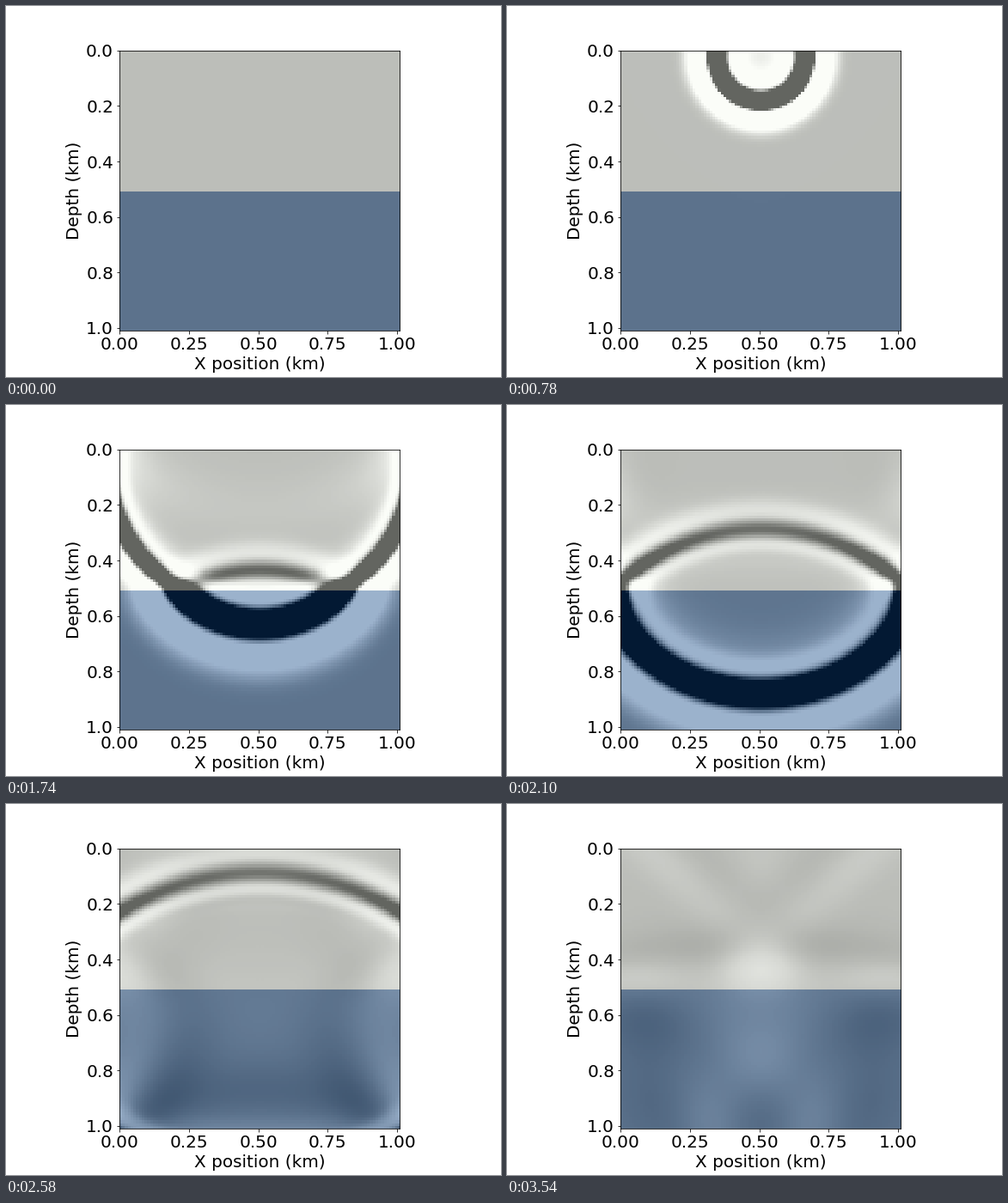
Animation, 576 px wide and 432 px high, one loop 3.57 s. Source, as a matplotlib script:

```python
"""Acoustic wave from a Ricker source crossing a two-layer velocity model."""
import numpy as np
import matplotlib.pyplot as plt
from matplotlib.animation import FuncAnimation

N = 101              # grid points per side
PAD = 40             # absorbing cells on each side
H = 10.0             # grid spacing, m
DT = 1.68            # time step, ms
F0 = 0.010           # peak frequency, kHz
FRAMES, STEPS_PER_FRAME, INTERVAL = 119, 5, 30
EXTENT = (0, 1.01, 1.01, 0)


def ricker(t):
    r = (np.pi * F0 * (t - 1 / F0)) ** 2
    return (1 - 2 * r) * np.exp(-r)


def damping():
    """Damping profile rising towards the outer edge, summed over both axes."""
    pos = (PAD + 1 - np.arange(PAD)) / PAD
    coeff = 1.5 * np.log(1000) / PAD
    edge = coeff * (pos - np.sin(2 * np.pi * pos) / (2 * np.pi)) / H
    line = np.zeros(N + 2 * PAD)
    line[:PAD] = edge
    line[-PAD:] = edge[::-1]
    return line[:, None] + line[None, :]


def simulate(vp):
    """Return one snapshot of the wavefield (depth, x) per frame."""
    m = 1 / np.pad(vp, PAD, mode="edge") ** 2
    damp = damping()
    src = (PAD + 2, PAD + N // 2)
    now = np.zeros_like(m)
    before = np.zeros_like(m)
    inner = slice(PAD, PAD + N)
    shots = [now[inner, inner].copy()]
    for step in range(1, FRAMES * STEPS_PER_FRAME):
        if step % STEPS_PER_FRAME == 0:
            shots.append(now[inner, inner].copy())
        p = np.pad(now, 1)
        lap = (p[2:, 1:-1] + p[:-2, 1:-1] + p[1:-1, 2:] + p[1:-1, :-2]
               - 4 * now) / H ** 2
        after = (m * (2 * now - before) + damp * DT * now
                 + DT ** 2 * lap) / (m + damp * DT)
        after[src] += ricker(step * DT) * DT ** 2 / m[src]
        before, now = now, after
    return shots


velocity = np.full((N, N), 2.5)
velocity[:51] = 1.5
snapshots = simulate(velocity)

plt.rcParams.update({"font.family": "DejaVu Sans", "font.size": 20})
fig, ax = plt.subplots(figsize=(8, 6), dpi=72)
fig.subplots_adjust(left=0.125, right=0.9, bottom=0.125, top=0.88)
ax.imshow(velocity, cmap="GnBu", vmin=1.5, vmax=2.5, extent=EXTENT,
          interpolation="nearest")
wave = ax.imshow(snapshots[0], cmap="Greys", vmin=-1, vmax=1, alpha=0.6,
                 extent=EXTENT, interpolation="nearest")
ax.set_xticks(np.arange(5) * 0.25)
ax.set_yticks(np.arange(6) * 0.2)
ax.set_xlabel("X position (km)")
ax.set_ylabel("Depth (km)")


def update(i):
    wave.set_data(snapshots[i])
    return (wave,)


anim = FuncAnimation(fig, update, frames=FRAMES, interval=INTERVAL,
                     repeat=True, repeat_delay=0)
plt.show()
```
